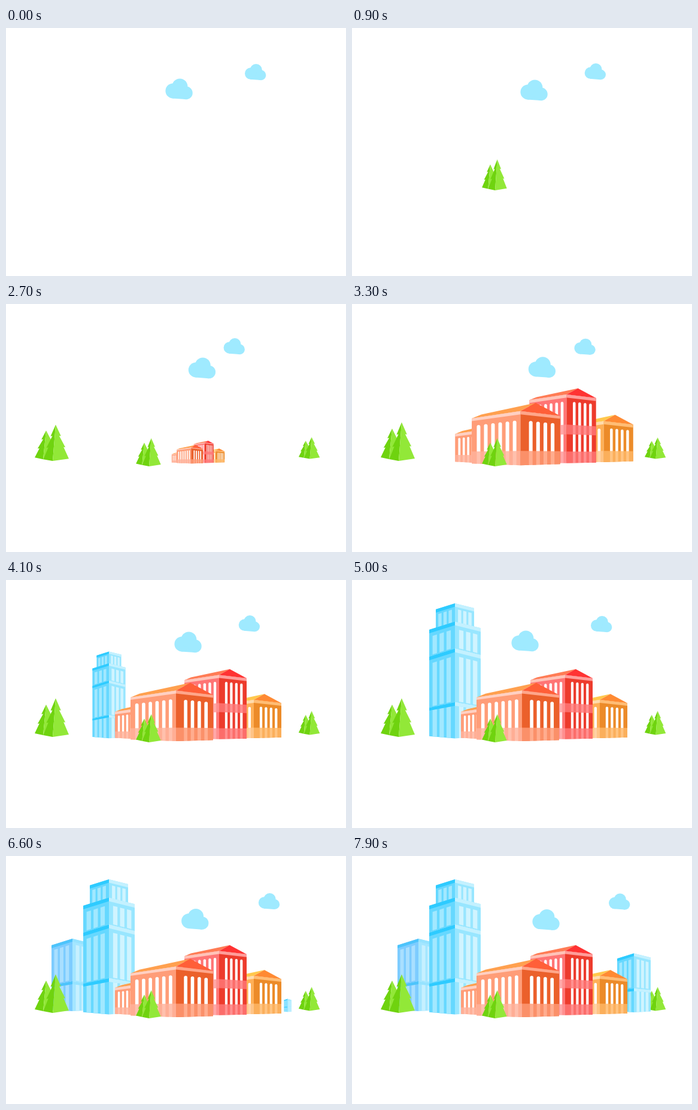
Recreate the animation shown at these times as an HTML page with a canvas. Size 568x414 px, loop 8 s.

```html
<!DOCTYPE html>
<html>
<head>
<meta charset="utf-8">
<style>
html, body { margin: 0; width: 100%; height: 100%; overflow: hidden; background: #fff; }
canvas { display: block; }
</style>
</head>
<body>
<canvas id="stage" width="568" height="414"></canvas>
<script>
const ctx = document.getElementById('stage').getContext('2d');
const LOOP = 8000;
const lerp = (a, b, p) => a + (b - a) * p;
const sine = p => (1 - Math.cos(Math.PI * p)) / 2;

function poly(color, ...points) {
  ctx.fillStyle = color;
  ctx.beginPath();
  for (const [x, y] of points) ctx.lineTo(x, y);
  ctx.fill();
}

// Wall receding from a corner: maps (share of width, height at the corner) to the stage.
// tilt(y) is the slope of the horizontal line that starts at height y.
const face = (x, width, side, tilt) => (d, y) =>
  [x + side * d * width, y + d * width * tilt(y) * (side < 0 ? 1 : 0.8)];

const panel = (at, color, d1, top, d2, bottom) =>
  poly(color, at(d1, top), at(d2, top), at(d2, bottom), at(d1, bottom));

const GLASS = [
  { wall: '#66d8ff', pane: '#a2e8ff', trim: '#2ecbff' },
  { wall: '#98e6ff', pane: '#d0f4ff', trim: '#c4f1ff' }
];
const HAZE = [
  { wall: '#7dccff', pane: '#a9dfff', trim: '#4dc4fb' },
  { wall: '#a4e6ff', pane: '#c6f0ff', trim: '#96e3ff' }
];
const glassTilt = y => Math.min(0.315, (247 - y) * 0.005);

// Glass block whose storeys start at the given levels; the last level is the ground
function glassBlock(x, half, levels, colors, trim, gap) {
  colors.forEach((c, i) => {
    const at = face(x, half, i ? 1 : -1, glassTilt);
    for (let k = 0; k + 1 < levels.length; k++) {
      const top = levels[k], bottom = levels[k + 1];
      const ground = k + 2 === levels.length;
      panel(at, c.wall, 0, top, 1, bottom);
      for (let d = 0.16; d < 0.8; d += 0.27)
        panel(at, c.pane, d, top + trim + (ground ? 0 : gap), d + 0.17, bottom - (ground ? 0 : 2));
      panel(at, c.trim, 0, top, 1, top + trim);
    }
  });
}

function tower() {
  glassBlock(172, 32, [39, 72, 72], GLASS, 5.5, 3.5);
  glassBlock(172, 43, [69.5, 114.5, 204, 264.5], GLASS, 6, 6);
}
const leftBlock = () => glassBlock(111, 35, [138, 209, 259], HAZE, 5, 4);
const rightBlock = () => glassBlock(471, 28, [162.5, 221, 261], GLASS, 4.5, 4);

const RED = [
  { wall: '#ff7575', base: '#ff9595', cornice: '#ffc3b8', roof: '#ff7c55' },
  { wall: '#ed3b2c', base: '#ff7878', cornice: '#ff9d9a', roof: '#ff3333' }
];
const AMBER = [
  { wall: '#ffb057', base: '#ffc990', cornice: '#ffdcae', roof: '#ffc84d' },
  { wall: '#ec8b29', base: '#ffb867', cornice: '#ffbd75', roof: '#ff8a33' }
];
const CORAL = [
  { wall: '#ff9d78', base: '#ffb29b', cornice: '#ffd0c2', roof: '#ffa04f' },
  { wall: '#eb602b', base: '#ff9c77', cornice: '#ffa68a', roof: '#ff5f38' }
];

// Evenly spaced round-headed windows, half as wide as their spacing
function arches(at, width, count, from, to, eaves, foot) {
  const pitch = (to - from) * width / (count - 1), w = pitch / 2;
  ctx.fillStyle = '#fff';
  for (let i = 0; i < count; i++) {
    const d = lerp(from, to, i / (count - 1));
    const [x, top] = at(d, eaves + 1.22 * pitch);
    ctx.beginPath();
    ctx.roundRect(x - w / 2, top, w, at(d, foot)[1] - top, [w / 2, w / 2, 0, 0]);
    ctx.fill();
  }
}

// Gabled hall seen from its corner; the translucent bands let the windows show through
function hall(x, eaves, foot, left, right, colors, base = 246.5, midBand) {
  const tilt = y => 0.15 * (252 - y) / (252 - eaves);
  const sides = [face(x, left, -1, tilt), face(x, right, 1, tilt)];
  const [far] = sides[0](1, 0), farEaves = sides[0](1, eaves)[1];
  const apex = [x + 0.385 * right, eaves - 0.21 * right];
  const back = [far + 0.24 * right, farEaves - 0.1 * right];

  sides.forEach((at, i) => {
    const c = colors[i], tint = c.base + 'd1';
    panel(at, c.wall, 0, eaves, 1, foot);
    if (i) arches(at, right, 4, 0.26, 0.81, eaves, foot);
    else arches(at, left, 6, 0.12, 0.86, eaves, foot);
    panel(at, tint, 0, base, 1, foot);
    if (midBand) panel(at, tint, 0, midBand, 1, midBand + 15);
  });
  poly(colors[0].roof, [far, farEaves], back, apex, [x, eaves]);
  poly(colors[1].roof, [x, eaves], apex, sides[1](1, eaves));
  sides.forEach((at, i) => panel(at, colors[i].cornice, 0, eaves, 1, eaves + 5));
}

function campus() {
  hall(414, 200, 264, 60, 46, AMBER);
  hall(356, 158.5, 265.5, 58, 46, RED, 247.5, 205.5);
  hall(229, 213, 266, 47, 46, CORAL, 253);
  hall(284, 184.5, 269, 76, 62, CORAL);
}

function grow(x, y, sx, sy, draw) {
  if (sx <= 0 || sy <= 0) return;
  ctx.save();
  ctx.translate(x, y);
  ctx.scale(sx, sy);
  draw();
  ctx.restore();
}

// Pop up past full size, then settle
function pop(t) {
  const p = Math.min(t / 1020, 1) - 1;
  return p <= -1 ? 0 : 1 + 2.45 * p ** 3 + 1.45 * p ** 2;
}

function building(t, x, y, draw) {
  const s = pop(t);
  grow(x, y, s, s, () => { ctx.translate(-x, -y); draw(); });
}

// Tree height: shoot up, sag, recover
function spring(t) {
  if (t <= 0) return 0;
  if (t < 300) return 1.1 * sine(t / 300);
  if (t < 1400) return lerp(1.1, 0.85, sine((t - 300) / 1100));
  return lerp(0.85, 1, sine(Math.min((t - 1400) / 700, 1)));
}

// Half a fir: two notches along the edge from apex to corner, then the trunk foot
function branch(color, apex, corner, foot) {
  const out = Math.sign(corner[0] - apex[0]), edge = [apex];
  for (const f of [1 / 3, 2 / 3]) {
    const x = lerp(apex[0], corner[0], f), y = lerp(apex[1], corner[1], f);
    edge.push([x + 1.5 * out, y], [x - 1.5 * out, y - 0.5]);
  }
  poly(color, ...edge, corner, foot);
}

function tree(x, y, size, t) {
  const dark = '#6fd30f', light = '#92e838';
  const rear = [-11, -54], front = [5, -64.5], rearFoot = [-16, -3], foot = [0, 0];
  grow(x, y, size, size * spring(t), () => {
    branch(dark, rear, [-30, -6], rearFoot);
    poly(light, rear, [-2, -36], rearFoot);
    branch(dark, front, rearFoot, foot);
    branch(light, front, [27, -4], foot);
  });
}

function cloud(x, y, size) {
  grow(x, y, size, size, () => {
    poly('#9feaff', [11.5, 33], [34, 34.7], [36, 13.4], [24, 8], [12, 9]);
    for (const [cx, cy, r] of [[12.5, 20.5, 12.5], [24, 13, 13], [34.5, 24, 10.8]]) {
      ctx.beginPath();
      ctx.arc(cx, cy, r, 0, 7);
      ctx.fill();
    }
  });
}

function clouds(t) {
  const phase = t % 5000 / 2500;
  const big = 41.7 * (phase < 1 ? phase : 2 - phase);
  const small = (t < 5000 ? -36 : 32) * sine(t / 2500);
  cloud(266.4 + big, 84.4 + big * 0.133, 1);
  cloud(399 + small, 60 + small * 0.085, 0.78);
}

function frame(now) {
  const t = now % LOOP;
  ctx.fillStyle = '#fff';
  ctx.fillRect(0, 0, 568, 414);
  clouds(t);
  tree(507.5, 258.5, 0.62, t - 1650);
  building(t - 5290, 111, 259, leftBlock);
  building(t - 3910, 172, 264, tower);
  building(t - 6547, 470.5, 260, rightBlock);
  building(t - 2620, 321, 265, campus);
  tree(78, 262, 1, t - 910);
  tree(239, 271, 0.73, t - 600);
  requestAnimationFrame(frame);
}
requestAnimationFrame(frame);
</script>
</body>
</html>
```
